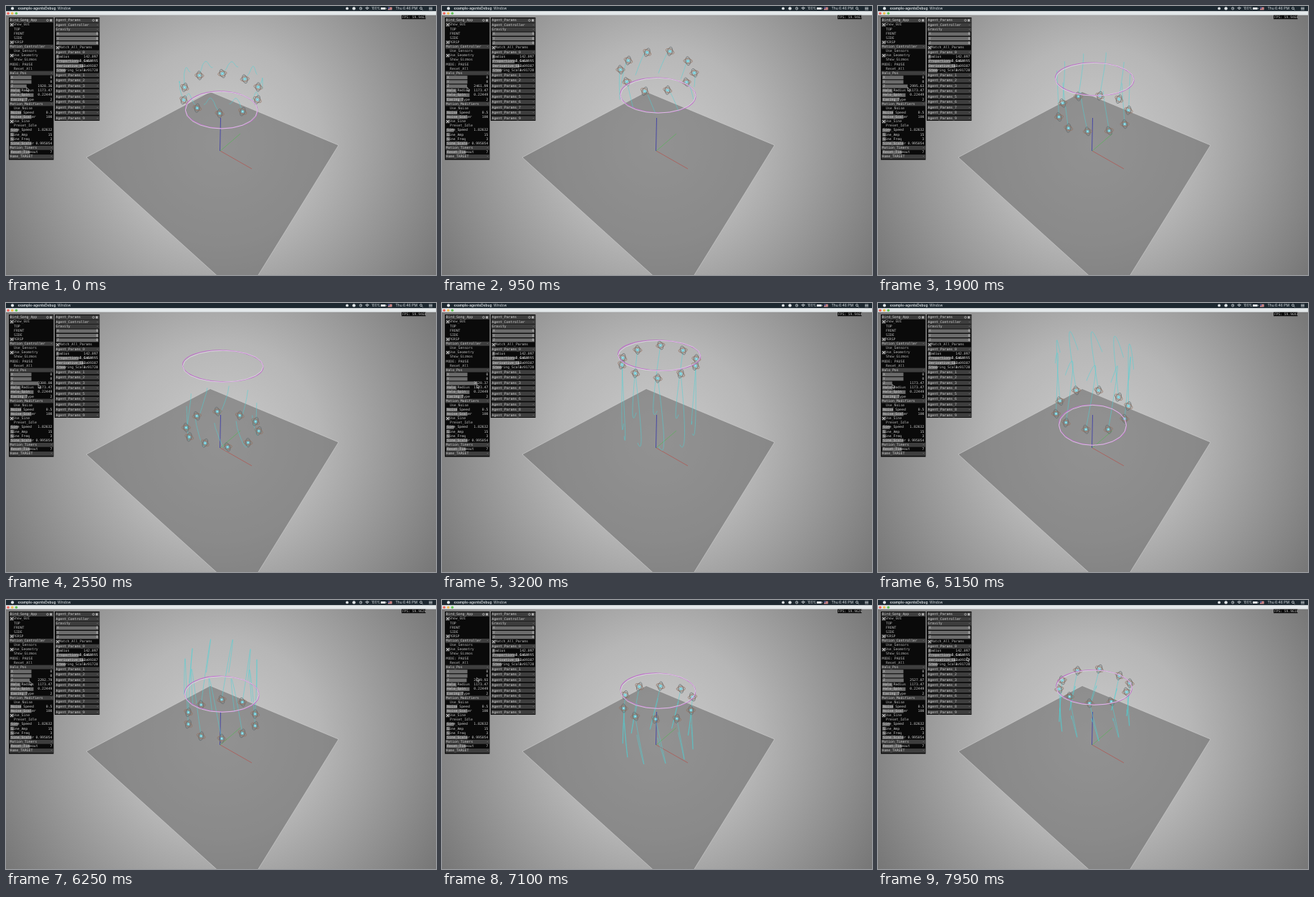
Recreate the animation shown at these times as an HTML page with a canvas. Size 600 px wide and 375 px high, loop 8 s.

```html
<!DOCTYPE html>
<html lang="en">
<head>
<meta charset="utf-8">
<title>Agents debug view</title>
<style>
html, body { margin: 0; width: 100%; height: 100%; overflow: hidden; background: #999; }
canvas { display: block; width: 600px; height: 375px; }
</style>
</head>
<body>
<canvas id="stage" width="600" height="375"></canvas>
<script>
const ctx = document.getElementById('stage').getContext('2d');
const LOOP = 8000, STEP = 50, TRAIL = 900, AGENTS = 10, TAU = Math.PI * 2;
const MONO = '4.8px "DejaVu Sans Mono", monospace';

// Flock pose: time, halo height, phase in degrees, centre, radii, tilt, fps.
const POSES = [
  [0, 1928.36, -2, 300, 122, 54, 28, 0, 59.9467],
  [1900, 2995.63, -10, 301, 150, 49, 27, 0, 59.9468],
  [3200, 3620.37, -2, 303, 82, 54, 21, 0, 59.9468],
  [4300, 1485.84, -11, 302, 87, 55, 23, 7, 59.9102],
  [5150, 1173.47, -10, 299, 149, 51, 28, 0, 59.9693],
  [6250, 2292.79, 0, 301, 166, 49, 27, 0, 59.9626],
  [7950, 2527.07, -8, 302, 120, 50, 23, 0, 59.9618]
];
// Vertical swing and number of swings between consecutive poses.
const SWINGS = [[-45, 1], [60, 1], [70, 1], [-50, 1], [-75, 1], [45, 2]];

const mix = (a, b, u) => a + (b - a) * u;
const clamp = u => Math.max(0, Math.min(1, u));
const ease = u => u * u * (3 - 2 * u);

function poseAt(t) {
  if (t < 0) {
    const [, z, phase, cx, cy, rx, ry] = POSES[0];
    const back = clamp(-t / 300);
    return { z, phase: phase + t * 0.025, cx, rx: rx + 4 * back, ry, tilt: 0,
             cy: cy - back * (15 + 4 * Math.sin(t / 110)) };
  }
  let i = 0;
  while (i < POSES.length - 2 && t >= POSES[i + 1][0]) i++;
  const a = POSES[i], b = POSES[i + 1];
  const u = clamp((t - a[0]) / (b[0] - a[0]));
  const [, z, phase, cx, cy, rx, ry, tilt] = a.map((v, k) => mix(v, b[k], ease(u)));
  const [swing, count] = SWINGS[i];
  const bump = Math.sin(Math.PI * u * count) ** 2;
  return { z, phase: phase + (i % 2 ? 14 : -14) * bump, cx, cy: cy + swing * bump,
           rx, ry, tilt, fps: u < 1 ? a[8] : b[8] };
}

function agentAt(i, t, pose = poseAt(t)) {
  const a = (i * 36 + pose.phase) * Math.PI / 180;
  return [pose.cx + pose.rx * Math.sin(a),
          pose.cy + pose.ry * Math.cos(a) + pose.tilt * Math.sin(a) + 2 * Math.sin(3 * a + t / 400)];
}

function rect(x, y, w, h, color) {
  ctx.fillStyle = color;
  ctx.fillRect(x, y, w, h);
}

function dot(x, y, r, color) {
  ctx.fillStyle = color;
  ctx.beginPath();
  ctx.arc(x, y, r, 0, TAU);
  ctx.fill();
}

function label(text, x, y, color = '#bbb', font = MONO, align = 'left') {
  ctx.font = font;
  ctx.fillStyle = color;
  ctx.textAlign = align;
  ctx.textBaseline = 'middle';
  ctx.fillText(text, x, y);
}

function path(points, color, width, closed) {
  ctx.strokeStyle = color;
  ctx.lineWidth = width;
  ctx.beginPath();
  points.forEach(p => ctx.lineTo(...p));
  if (closed) ctx.closePath();
  ctx.stroke();
}

function oval(x, y, rx, ry, turn, color, width) {
  ctx.strokeStyle = color;
  ctx.lineWidth = width;
  ctx.beginPath();
  ctx.ellipse(x, y, rx, ry, turn, 0, TAU);
  ctx.stroke();
}

function drawScene() {
  const glow = ctx.createRadialGradient(300, 192, 0, 300, 192, 365);
  glow.addColorStop(0, '#cbcbcb');
  glow.addColorStop(0.38, '#b6b6b6');
  glow.addColorStop(1, '#727272');
  rect(0, 0, 600, 375, glow);

  const floor = [[285, 119.5], [464, 194], [331, 409], [112, 211]];
  ctx.beginPath();
  floor.forEach(p => ctx.lineTo(...p));
  ctx.fillStyle = 'rgba(112,112,112,.62)';
  ctx.fill();
  path(floor, '#d2d2d2', 0.6, true);

  path([[299, 202], [343, 227]], '#b4524c', 0.7);
  path([[299, 202], [327, 178]], '#58b458', 0.7);
  path([[298.5, 202], [299.5, 156]], '#4040a8', 0.9);
}

function drawHalo(z) {
  const d = (z - 1173.47) / 1000;
  const cx = 299.5 + 1.5 * d, cy = 170 - 30.7 * d - 3.65 * d * d;
  const rx = 47 + 4.3 * d, ry = 28 - 2.8 * d;
  oval(cx, cy, rx, ry, 0.03, '#bd72c8', 1.1);
  const polygon = Array.from({ length: 20 }, (_, i) => {
    const a = i * TAU / 20;
    return [cx + rx * Math.cos(a), cy + ry * Math.sin(a) + 0.4];
  });
  path(polygon, '#eadff0', 0.7, true);
}

function drawAgents(t) {
  ctx.lineJoin = 'round';
  for (let i = 0; i < AGENTS; i++) {
    const trail = [];
    for (let age = TRAIL; age >= 0; age -= 30) trail.push(agentAt(i, t - age));
    path(trail, 'rgba(75,212,214,.75)', 0.7);
  }
  const pose = poseAt(t);
  for (let i = 0; i < AGENTS; i++) {
    const [x, y] = agentAt(i, t, pose);
    const turn = 0.4 * Math.sin(t / 500 + i);
    oval(x, y, 4.2, 4.2, 0, '#7d7a70', 0.6);
    oval(x, y, 3.2, 6.2, turn, '#5f676a', 0.7);
    oval(x, y, 6.2, 3, turn + 0.2, '#95705f', 0.7);
    dot(x, y, 1.9, '#62c8d6');
    dot(x, y, 0.8, '#d7f7fa');
  }
}

// Rows: [kind, text, value, fill]; kinds: h header, c checked, b button, l label, s slider.
const controls = z => [
  ['h', 'Bird_Song_App'], ['c', 'Show_GUI'], ['b', 'TOP'], ['b', 'FRONT'], ['b', 'SIDE'], ['c', 'PERSP'],
  ['h', 'Motion_Controller'], ['b', 'Use_Sensors'], ['c', 'Use_Geometry'], ['b', 'Show_Gizmos'],
  ['l', 'MODE: PAUSE'], ['b', 'Reset_All'],
  ['h', 'Halo_Pos'], ['s', 'X', '0', 0.5], ['s', 'Y', '0', 0.5], ['s', 'Z', z.toFixed(2), z / 5000],
  ['s', 'Halo_Radius', '1173.47', 0.24], ['s', 'Halo_Spin', '0.22449', 0.55], ['s', 'Easing_Type', '2', 0.4],
  ['h', 'Motion_Modifiers'], ['b', 'Use_Noise'], ['s', 'Noise_Speed', '0.5', 0.26],
  ['s', 'Noise_Scaler', '100', 0.5], ['c', 'Use_Sine'], ['b', 'Preset_Idle'],
  ['s', 'Sine_Speed', '1.82632', 0.18], ['s', 'Sine_Amp', '15', 0.08], ['s', 'Sine_Freq', '3', 0.08],
  ['s', 'Sine_Scaler', '0.995054', 0.5],
  ['h', 'Motion_Timers'], ['s', 'Reset_Timeout', '7', 0.46], ['h', 'Home_TARGET']
];
const PARAMS = [
  ['h', 'Agent_Params'], ['h', 'Agent_Controller'], ['h', 'Gravity'],
  ['s', 'X', '0', 1], ['s', 'Y', '0', 1], ['s', 'Z', '0', 1], ['c', 'Match_All_Params'],
  ['h', 'Agent_Params_0'], ['s', 'Radius', '142.097', 0.06], ['s', 'Proportional_Gain', '0.6460995', 0.53],
  ['s', 'Derivative_Gain', '13.09387', 0.64], ['s', 'Steering_Scaler', '1.01728', 0.22],
  ...Array.from({ length: 9 }, (_, i) => ['h', 'Agent_Params_' + (i + 1)])
];

function drawRow([kind, text, value, fill], x, y, top) {
  const left = x + 2, width = 59;
  if (kind === 'h') {
    rect(x + 1, y - 2.9, 61, 5.8, '#3e3e3e');
    label(text, x + 1.5, y, '#ccc');
    if (top) {
      oval(x + 54, y, 1.4, 1.4, 0, '#ccc', 0.6);
      rect(x + 57.3, y - 1.6, 2.8, 3.2, '#bbb');
    } else label('-', x + 58, y);
    return;
  }
  if (kind === 's') {
    rect(left, y - 2.5, width * fill, 5, '#6c6c6c');
    label(text, left + 1, y, '#ccc');
    label(value, x + 60.5, y, '#ccc', MONO, 'right');
    return;
  }
  if (kind === 'c') {
    rect(left - 0.5, y - 2.3, 5, 4.8, '#555');
    path([[left, y - 2], [left + 4, y + 2]], '#eee', 0.7);
    path([[left + 4, y - 2], [left, y + 2]], '#eee', 0.7);
  }
  label(text, kind === 'l' ? x + 1.5 : kind === 'c' ? x + 6 : x + 7, y);
}

function drawPanels(z) {
  rect(4, 16, 62.5, 198.5, '#0a0a0a');
  controls(z).forEach((row, i) => drawRow(row, 4, 20 + i * 6.13, i === 0));
  rect(68, 16, 62.5, 144, '#0a0a0a');
  PARAMS.forEach((row, i) => drawRow(row, 68, i < 13 ? 20 + i * 6.36 : 96.3 + (i - 12) * 7.5, i === 0));
}

function drawWindowBars(fps) {
  const ink = '#dfe4e7', ui = '5px Inter, sans-serif';
  rect(0, 0, 600, 7.2, '#1d2830');
  rect(0, 7.2, 600, 5.6, '#e3e8ea');
  rect(0, 12.4, 600, 0.5, '#b5b9bb');
  dot(9, 3.4, 2.1, ink);
  label('example-agentsDebug', 16.5, 3.5, ink, '600 4.8px Inter, sans-serif');
  label('Window', 72, 3.5, ink, '4.8px Inter, sans-serif');
  dot(476, 3.4, 1.9, ink);
  dot(485.5, 3.4, 2.2, ink);
  oval(495, 3.4, 1.7, 1.7, 0, ink, 0.7);
  path([[495, 2], [495, 3.5], [496, 4]], ink, 0.6);
  for (const r of [1.2, 2.5, 3.7]) {
    ctx.strokeStyle = ink;
    ctx.lineWidth = 0.8;
    ctx.beginPath();
    ctx.arc(504, 5.5, r, Math.PI * 1.25, Math.PI * 1.75);
    ctx.stroke();
  }
  label('100%', 510, 3.5, ink, '4.6px Inter, sans-serif');
  rect(523, 2, 6.5, 3, ink);
  rect(530, 2.8, 0.7, 1.4, ink);
  rect(533, 1.8, 5.5, 3.5, '#e8d6d6');
  for (let i = 0; i < 3; i++) rect(533, 1.8 + i * 1.35, 5.5, 0.7, '#bc4848');
  rect(533, 1.8, 2.4, 1.9, '#394f91');
  label('Thu 6:46 PM', 543.5, 3.5, ink, ui);
  oval(579, 3.1, 1.5, 1.5, 0, ink, 0.7);
  path([[580, 4.2], [581.5, 5.7]], ink, 0.8);
  for (let i = 0; i < 3; i++) rect(590, 1.7 + i * 1.5, 5, 0.7, ink);
  ['#ee6259', '#f4bd4f', '#62c655'].forEach((color, i) => dot(3 + i * 5.7, 10.2, 1.8, color));
  rect(552, 12.8, 33.5, 5.5, '#0a0a0a');
  label('FPS: ' + fps.toFixed(4), 553, 15.6, '#bbb', '4.6px "DejaVu Sans Mono", monospace');
}

function drawCursor(t, z) {
  const leave = ease(clamp((t - 6850) / 1000));
  const x = mix(6 + z / 5000 * 59, 124, leave), y = mix(113.5, 80, leave);
  ctx.beginPath();
  for (const [dx, dy] of [[0, 0], [0, 5], [1.2, 4], [2.1, 6], [3, 5.6], [2.1, 3.7], [3.7, 3.6]])
    ctx.lineTo(x + dx, y + dy);
  ctx.closePath();
  ctx.fillStyle = '#111';
  ctx.fill();
  ctx.strokeStyle = '#fff';
  ctx.lineWidth = 0.5;
  ctx.stroke();
}

function draw(t) {
  const { z, fps } = poseAt(t);
  drawScene();
  drawAgents(t);
  drawHalo(z);
  drawPanels(z);
  drawWindowBars(fps);
  drawCursor(t, z);
}

const start = performance.now();
function tick() {
  const elapsed = (performance.now() - start) % LOOP;
  draw(Math.floor(elapsed / STEP) * STEP);
  requestAnimationFrame(tick);
}
tick();
</script>
</body>
</html>
```
